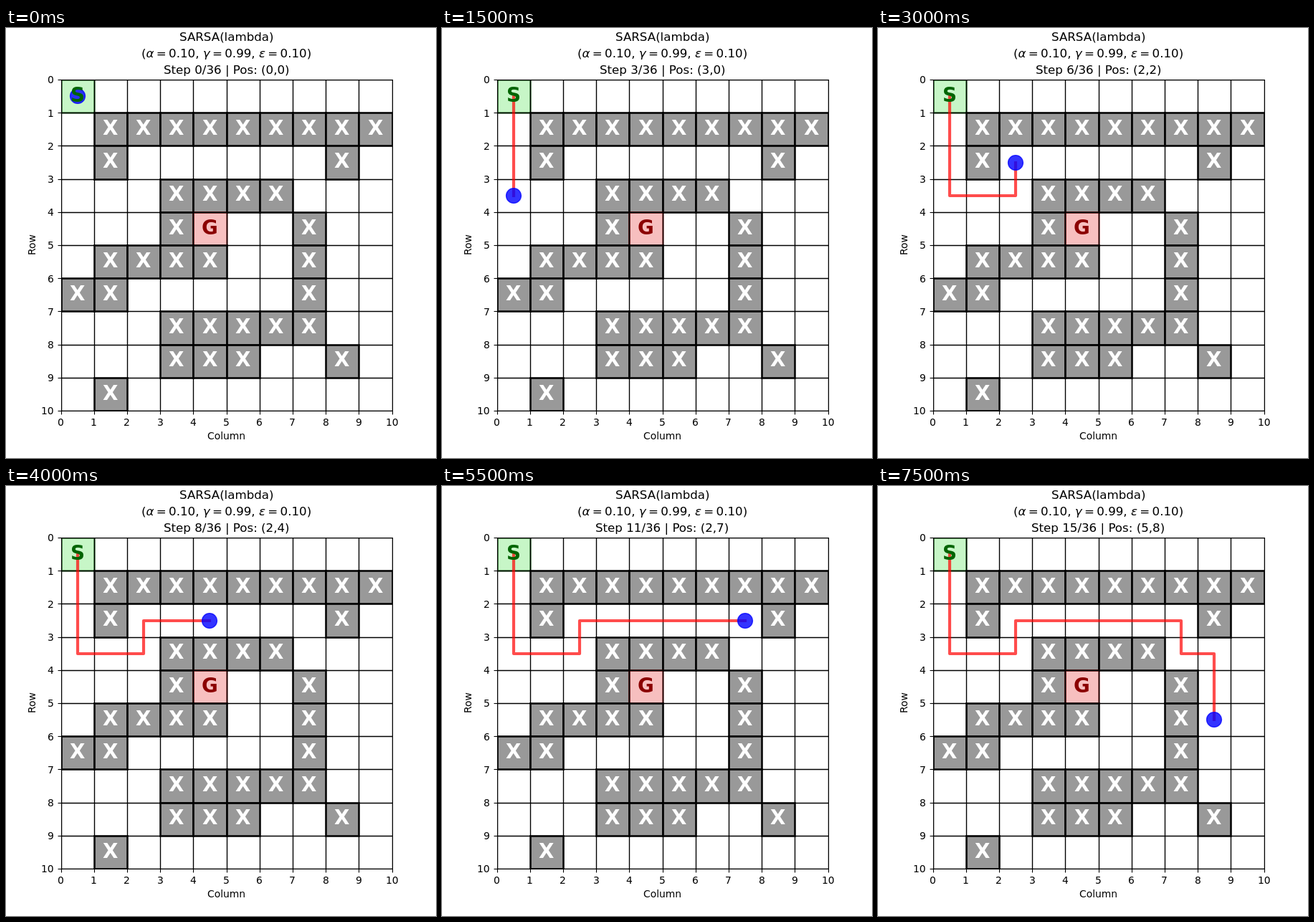
Animation of 600 by 600 pixels, one loop 8 s. Source, as an HTML page with a canvas:

```html
<!DOCTYPE html>
<html lang="en">
<head>
<meta charset="utf-8">
<title>Grid walk</title>
<style>
  html, body { margin: 0; width: 100%; height: 100%; overflow: hidden; background: #fff; }
  canvas { display: block; }
</style>
</head>
<body>
<canvas id="stage" width="600" height="600"></canvas>
<script>
const ctx = document.getElementById('stage').getContext('2d');
const N = 10, CELL = 46.2, LEFT = 76.5, TOP = 72;
const STEP_MS = 500, TOTAL = 36;
const PT = 100 / 72; // pixels per point

// One string per row: # is a wall
const MAZE = [
  'S.........',
  '.#########',
  '.#......#.',
  '...####...',
  '...#G..#..',
  '.####..#..',
  '##.....#..',
  '...#####..',
  '...###..#.',
  '.#........'
];
const MOVES = 'DDDRRURRRRRDRDD';
const DIRS = { D: [1, 0], U: [-1, 0], R: [0, 1], L: [0, -1] };

const KINDS = {
  '#': { fill: '#808080', edge: '#000', alpha: 0.8, label: 'X', ink: '#fff' },
  S: { fill: '#90ee90', edge: '#006400', alpha: 0.5, label: 'S', ink: '#006400' },
  G: { fill: '#f08080', edge: '#8b0000', alpha: 0.5, label: 'G', ink: '#8b0000' }
};

const path = [[0, 0]];
for (const m of MOVES) {
  const [r, c] = path[path.length - 1];
  path.push([r + DIRS[m][0], c + DIRS[m][1]]);
}

const px = c => LEFT + c * CELL;
const py = r => TOP + r * CELL;
const snap = v => Math.floor(v + 0.5 + 1e-6);
const gx = c => snap(px(c)) + 0.5;
const gy = r => snap(py(r)) + 0.5;
const font = (pt, style = '') => `${style} ${pt * PT}px "DejaVu Sans", sans-serif`;

function line(x1, y1, x2, y2) {
  ctx.beginPath();
  ctx.moveTo(x1, y1);
  ctx.lineTo(x2, y2);
  ctx.stroke();
}

// Text with its left edge on a whole pixel; align: 0 left, 0.5 centre, 1 right
function text(str, x, y, align = 0.5) {
  ctx.fillText(str, Math.round(x - ctx.measureText(str).width * align), Math.round(y));
}

function eachCell(fn) {
  MAZE.forEach((row, r) => [...row].forEach((ch, c) => {
    if (KINDS[ch]) fn(KINDS[ch], r, c);
  }));
}

function drawBoard() {
  ctx.save();
  ctx.beginPath();
  ctx.rect(snap(LEFT), TOP, snap(px(N)) - snap(LEFT) + 1, N * CELL + 1);
  ctx.clip();
  ctx.lineWidth = 2 * PT;
  eachCell((kind, r, c) => {
    const box = [gx(c), gy(r), gx(c + 1) - gx(c), gy(r + 1) - gy(r)];
    ctx.globalAlpha = kind.alpha;
    ctx.fillStyle = kind.fill;
    ctx.strokeStyle = kind.edge;
    ctx.fillRect(...box);
    ctx.strokeRect(...box);
  });
  ctx.globalAlpha = 1;
  ctx.strokeStyle = '#000';
  ctx.lineWidth = PT;
  for (let i = 0; i <= N; i++) {
    line(gx(i), TOP, gx(i), py(N) + 1);
    line(snap(LEFT), gy(i), snap(px(N)) + 1, gy(i));
  }
  ctx.restore();
}

function drawAxes() {
  ctx.strokeStyle = ctx.fillStyle = '#000';
  ctx.lineWidth = 0.8 * PT;
  ctx.strokeRect(gx(0), gy(0), gx(N) - gx(0), gy(N) - gy(0));
  ctx.font = font(10);
  for (let i = 0; i <= N; i++) {
    line(gx(i), 534.5, gx(i), 539.5);
    line(72.5, gy(i), 77.5, gy(i));
    text(i, px(i), 555);
    text(i, 66.8, py(i) + 5.3, 1);
  }
  text('Column', 307.5, 574);
  ctx.save();
  ctx.translate(41, 303);
  ctx.rotate(-Math.PI / 2);
  text('Row', 0, 0);
  ctx.restore();
}

function drawParams(y) {
  const size = 12 * PT, gap = 0.2 * size;
  const parts = [];
  const add = (str, style = '', pad = 0) => parts.push({ str, style, pad });
  [['(', 'α', '0.10'], [', ', 'γ', '0.99'], [', ', 'ε', '0.10']].forEach(([pre, sym, val]) => {
    add(pre);
    add(sym, 'italic', gap);
    add('=', '', gap);
    add(val);
  });
  add(')');
  let width = 0;
  for (const p of parts) {
    ctx.font = font(12, p.style);
    p.x = width;
    width += ctx.measureText(p.str).width + p.pad;
  }
  const x0 = Math.round(307.5 - width / 2);
  for (const p of parts) {
    ctx.font = font(12, p.style);
    ctx.fillText(p.str, x0 + p.x, y);
  }
}

function drawTitle(step) {
  const [r, c] = path[step];
  ctx.fillStyle = '#000';
  ctx.font = font(12);
  text('SARSA(lambda)', 307.5, 18);
  text(`Step ${step}/${TOTAL} | Pos: (${r},${c})`, 307.5, 64);
  drawParams(41);
}

function drawAgent(step) {
  const pts = path.slice(0, step + 1).map(([r, c]) => [snap(px(c + 0.5)), snap(py(r + 0.5))]);
  ctx.save();
  if (step > 0) {
    ctx.globalAlpha = 0.7;
    ctx.strokeStyle = '#f00';
    ctx.lineWidth = 3 * PT;
    ctx.lineCap = 'square';
    ctx.lineJoin = 'round';
    ctx.beginPath();
    pts.forEach(p => ctx.lineTo(...p));
    ctx.stroke();
  }
  ctx.globalAlpha = 0.8;
  ctx.fillStyle = ctx.strokeStyle = '#00f';
  ctx.lineWidth = PT;
  ctx.beginPath();
  ctx.arc(...pts[step], 7.5 * PT, 0, Math.PI * 2);
  ctx.fill();
  ctx.stroke();
  ctx.restore();
}

function drawLabels() {
  ctx.font = font(20, 'bold');
  eachCell((kind, r, c) => {
    ctx.fillStyle = kind.ink;
    text(kind.label, px(c + 0.5), py(r + 0.5) + 7.7);
  });
}

function draw(step) {
  ctx.fillStyle = '#fff';
  ctx.fillRect(0, 0, 600, 600);
  drawBoard();
  drawAgent(step);
  drawAxes();
  drawLabels();
  drawTitle(step);
}

const start = performance.now();
function tick() {
  const t = performance.now() - start;
  draw(Math.floor(t / STEP_MS) % path.length);
  requestAnimationFrame(tick);
}
tick();
</script>
</body>
</html>
```
